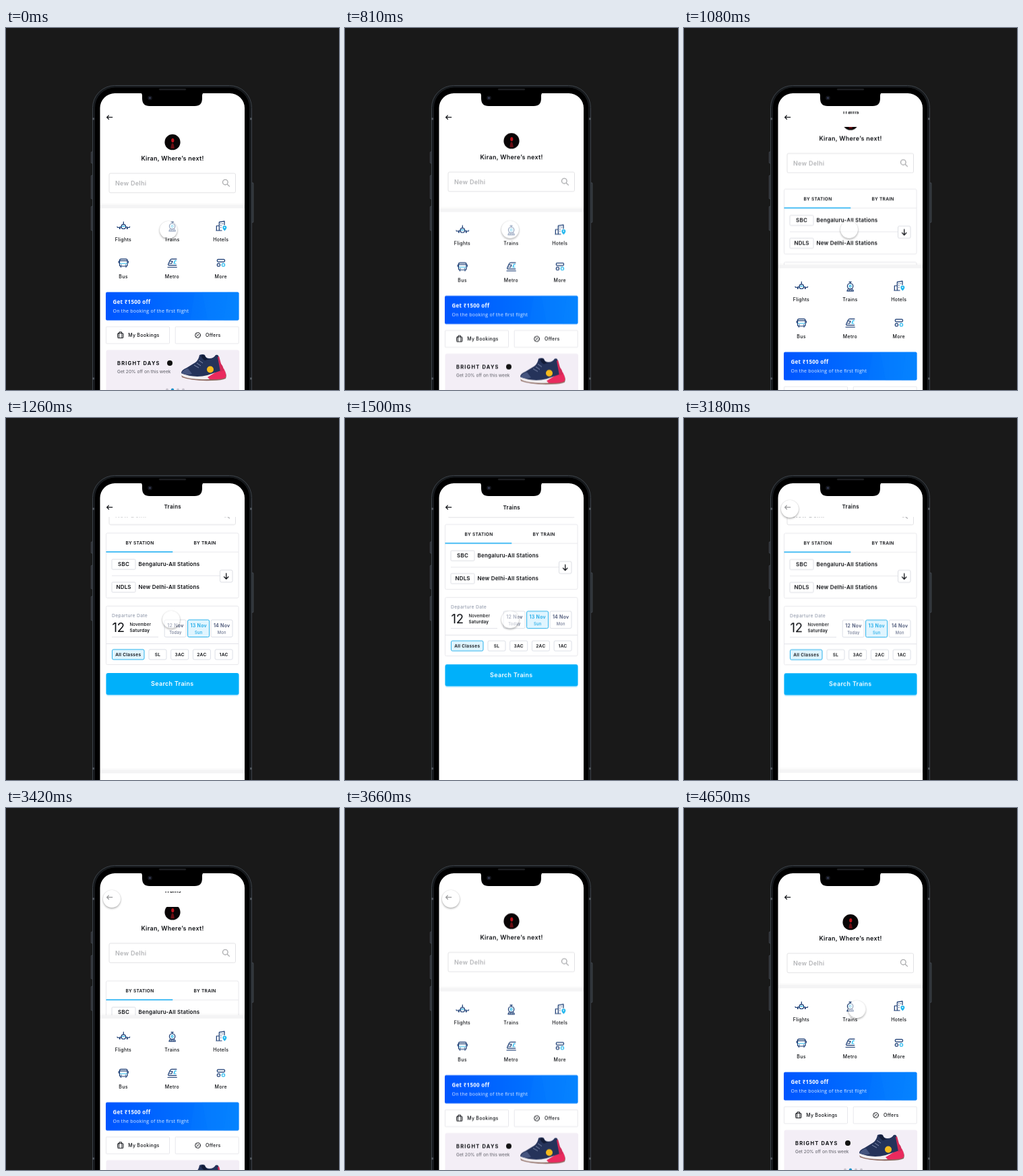
An HTML page for the animation above (4.68 s loop, 494 by 538 pixels).

```html
<!DOCTYPE html>
<html lang="en">
<head>
<meta charset="utf-8">
<title>Travel app</title>
<style>
  html, body { margin: 0; width: 100%; height: 100%; overflow: hidden; background: #191919; }
  svg { position: absolute; left: 0; top: 0; width: 494px; height: 538px; }
  text { font: 500 7px Inter, sans-serif; letter-spacing: .28px; fill: #0c0e12; }
  .mid { text-anchor: middle; }
  .bold { font-weight: 600; }
  .open { font-family: "Open Sans", "Noto Sans", sans-serif; fill: #fff; }
  .box { fill: #fff; stroke: #e8e8ec; stroke-width: 1; }
  .rule { stroke: #e9e9ed; stroke-width: 1; }
  .icon { fill: none; stroke: #12356f; stroke-width: 1.2; stroke-linecap: round; stroke-linejoin: round; }
  .icon .c { stroke: #1ab5ee; }
  .ink { fill: none; stroke: #16181d; stroke-width: 1.1; stroke-linecap: round; stroke-linejoin: round; }

  /* every layer shares one progress; only the two end offsets differ */
  .slide { animation: slide 4680ms cubic-bezier(.82, 0, .12, 1) infinite; }
  @keyframes slide {
    0%, 13.675% { transform: translateY(var(--home)); }
    35.043%, 60.47% { transform: translateY(var(--trip)); }
    81.838%, 100% { transform: translateY(var(--home)); }
  }
  .profile { --home: 0px; --trip: -98px; }
  .cards { --home: 118px; --trip: 0px; }
  .panel { --home: 0px; --trip: 295px; }
  .title { --home: -12px; --trip: 0px; }

  #tap {
    position: absolute; left: -13px; top: -13px; width: 26px; height: 26px; border-radius: 50%;
    background: rgba(255, 255, 255, .56);
    box-shadow: 0 1.5px 3px rgba(0, 0, 0, .32), 0 0 1px rgba(0, 0, 0, .25);
    animation: tap 4680ms linear infinite;
  }
  @keyframes tap {
    0%, 1.923% { transform: translate(241px, 300px); animation-timing-function: ease-out; }
    7.692%, 38.034% { transform: translate(245px, 299.5px); animation-timing-function: cubic-bezier(.7, 0, .3, .93); }
    49.359% { transform: translate(164.5px, 138px); animation-timing-function: cubic-bezier(.1, .6, .4, 1); }
    54.487%, 82.265% { transform: translate(157px, 135px); animation-timing-function: cubic-bezier(.8, 0, .95, .78); }
    92.949% { transform: translate(172px, 186px); }
    99.359% { transform: translate(257px, 299px); }
    100% { transform: translate(241px, 300px); }
  }
</style>
</head>
<body>
<svg viewBox="0 0 494 538">
  <defs>
    <clipPath id="body"><rect x="140" y="147" width="214" height="391"/></clipPath>
    <clipPath id="bar"><rect x="200" y="124.5" width="100" height="20"/></clipPath>
    <clipPath id="deal"><rect x="148" y="392.5" width="197.5" height="42" rx="2"/></clipPath>
    <linearGradient id="blue"><stop stop-color="#0055ff"/><stop offset="1" stop-color="#0080ff"/></linearGradient>
  </defs>

  <!-- phone -->
  <g fill="#2a2e34" stroke="#555b63" stroke-width=".6">
    <rect x="126.3" y="184" width="4" height="17" rx="1"/>
    <rect x="126.3" y="219" width="4" height="35" rx="1"/>
    <rect x="126.3" y="265" width="4" height="36" rx="1"/>
    <rect x="363" y="230" width="4" height="59" rx="1"/>
  </g>
  <rect x="128.5" y="85.5" width="236" height="500" rx="33" fill="#15181b" stroke="#3d434a"/>
  <rect x="131.5" y="88" width="230" height="500" rx="30.5" fill="#000" stroke="#24282d" stroke-width=".6"/>
  <path d="M128 135h3M362 135h3M128 521h3M362 521h3" stroke="#50565d" stroke-width="3"/>

  <rect x="139.5" y="97" width="214.5" height="470" rx="22" fill="#fff"/>
  <g clip-path="url(#body)">
    <g class="slide profile">
      <circle cx="247" cy="169.7" r="11.6" fill="#090506"/>
      <g fill="#c4141d">
        <ellipse cx="247.3" cy="167" rx="2.1" ry="3"/>
        <path d="M244.5 179q.5-8 2.5-8t2.800 8z" opacity=".5"/>
      </g>
      <text class="mid bold" x="247" y="196.8" style="font-size:9px">Kiran, Where’s next!</text>
      <rect class="box" x="153" y="216" width="187.5" height="28.800" rx="2" style="stroke:#e2e2e4"/>
      <text class="bold" x="162" y="233.6" style="font-size:9px;fill:#b4b5b8">New Delhi</text>
      <g fill="none" stroke="#a8a9ac" stroke-width="1.3"><circle cx="325.3" cy="229.2" r="3.8"/><path d="M328.2 232.2l3.6 3.4"/></g>
    </g>

    <g class="slide cards">
      <rect class="box" x="148.5" y="157" width="196.5" height="96.5" rx="2"/>
      <path class="rule" d="M149 185.2h196M157 220.5h160"/>
      <path d="M148.5 185h98.8" stroke="#14aef5" stroke-width="1.6"/>
      <text class="mid bold" x="198.5" y="174.4" style="font-size:6.6px">BY STATION</text>
      <text class="mid bold" x="295" y="173.8" style="font-size:6.6px">BY TRAIN</text>
      <g class="box" style="stroke:#dcdee4">
        <rect x="157" y="196" width="35" height="15" rx="1.5"/>
        <rect x="157" y="230" width="35" height="15" rx="1.5"/>
        <rect x="317.5" y="212" width="18.5" height="18" rx="2"/>
      </g>
      <path class="ink" d="M326.7 217v8M323.5 222l3.2 3.2 3.2-3.2" style="stroke-width:1.3"/>
      <g style="--stop:8px">
        <text class="mid bold stop" x="174.6" y="206.4">SBC</text>
        <text class="bold stop" x="196.5" y="206.4">Bengaluru-All Stations</text>
        <text class="mid bold stop" x="174.6" y="240.4">NDLS</text>
        <text class="bold stop" x="196.5" y="240.4">New Delhi-All Stations</text>
      </g>

      <rect class="box" x="148.5" y="265.5" width="196.5" height="87" rx="2"/>
      <text x="157" y="282" style="font-weight:400;font-size:6.8px;fill:#8790a3">Departure Date</text>
      <text x="157.5" y="304" style="font-weight:400;font-size:18.5px;letter-spacing:-.3px">12</text>
      <text x="183.4" y="295.3" style="font-size:6.2px;letter-spacing:.1px">November</text>
      <text class="bold" x="183.4" y="303.8" style="font-size:6.4px">Saturday</text>
      <path class="rule" d="M157 311.5h69M149 321.5h196" style="stroke:#e2e3e9"/>
      <g id="days"></g>
      <g id="classes"></g>

      <rect x="148.5" y="366.5" width="197" height="33" rx="3" fill="#00b0fa" opacity=".16"/>
      <rect x="148.5" y="365" width="197" height="32.5" rx="3" fill="#00b0fa"/>
      <text class="mid bold" x="246.8" y="384.4" style="font-size:9px;fill:#fff">Search Trains</text>
    </g>

    <g class="slide panel">
      <rect x="139" y="260.5" width="216" height="3" fill="#000" opacity=".02"/>
      <rect x="139" y="263" width="216" height="330" fill="#fff"/>
      <rect x="139" y="263" width="216" height="5" fill="#f4f4f5"/>

      <g class="icon">
        <!-- plane -->
        <path d="M174.3 288v3.6M165 295.3q0 1.300 1.500 1.200l4.500-.8M177.600 295.700l4.500.8q1.500.1 1.500-1.200"/>
        <circle cx="174.3" cy="295.2" r="3.3"/>
        <path class="c" d="M172.500 294.600h3.600"/>
        <path d="M168.800 297v1.200M179.800 297v1.200" stroke-width="1.8"/>
        <!-- locomotive -->
        <path d="M245 288.300h3.200M246.600 288.300v2M243.800 298.500l-2 3.300h9.600l-2-3.300M244.800 301.600l.8-2.400M248.400 301.600l-.8-2.400"/>
        <circle cx="246.600" cy="294.700" r="4.200"/>
        <circle class="c" cx="246.600" cy="294.700" r="1.500"/>
        <!-- hotel -->
        <path d="M312.300 300.800v-6.800h4v6.800M316.300 294v-5.600l7.700-1.200v5.300M311.800 301h8.200M318.700 290.800h.2M321.400 290.800h.2M318.700 293.700h.2M318.700 296.600h.2"/>
        <path d="M324.300 301.600q-3-3-3-4.900a3 3 0 0 1 6 0q0 1.900-3 4.900z" fill="#1ab5ee" stroke="none"/>
        <circle cx="324.300" cy="296.600" r="1" fill="#fff" stroke="none"/>
        <!-- bus -->
        <rect x="168.500" y="343.300" width="11.500" height="10.700" rx="2"/>
        <path d="M168.500 345.800h11.500M167.200 346.500v2.500M181.300 346.500v2.500M170.500 354.300v1.200M178 354.300v1.200M171 352.200h.2M177.300 352.200h.2"/>
        <path class="c" d="M169.500 350h9.500"/>
        <!-- metro -->
        <path d="M253 343.300h-7q-1.800 0-2.500 1.700l-2.800 6q-.4 1.700 1 1.700h11M240 355.500h13.300M244 346.500h3l-1.300 3.500h-3"/>
        <path class="c" d="M252.500 345.800h-2l-1.500 4.200h3"/>
        <!-- more -->
        <rect x="313.300" y="343.800" width="11.200" height="3.800" rx="1.500"/>
        <rect x="313.300" y="350.200" width="4.200" height="4" rx="1.500"/>
        <rect class="c" x="320.300" y="350.200" width="4.200" height="4" rx="1.500"/>
      </g>
      <g id="menu"></g>

      <g clip-path="url(#deal)">
        <rect x="148" y="392" width="198" height="43" fill="url(#blue)"/>
        <g fill="#1088ff">
          <path d="M273 435l7-43h66v43z" opacity=".12"/>
          <path d="M299 435l-8-43h55v43z" opacity=".18"/>
          <path d="M323 435l6-43h17v43z" opacity=".14"/>
        </g>
      </g>
      <text class="open" x="158.5" y="410.3" style="font-size:8px;font-weight:700">Get ₹1500 off</text>
      <text class="open" x="158.5" y="423" style="font-weight:400;letter-spacing:.25px;opacity:.9">On the booking of the first flight</text>

      <rect class="box" x="148.5" y="444" width="94" height="25" rx="1"/>
      <rect class="box" x="251.2" y="444" width="94" height="25" rx="1"/>
      <g class="ink" style="stroke-width:1">
        <rect x="165.5" y="453.7" width="8.5" height="7" rx="1"/>
        <path d="M168 453.5v-1.700h3.500v1.700M167.500 454v6.500M172 454v6.500"/>
        <circle cx="284.5" cy="456.6" r="3.9"/>
        <path d="M286 455l-3 3.200M283 455.200h.1M286 458.100h.1"/>
      </g>
      <text x="181.2" y="459">My Bookings</text>
      <text x="296" y="459">Offers</text>

      <rect x="148.5" y="478.5" width="197.5" height="90" rx="3" fill="#f3eef6"/>
      <text x="165" y="501" style="font-size:7.5px;font-weight:700;letter-spacing:1.2px">BRIGHT DAYS</text>
      <circle cx="243" cy="498" r="4" fill="#111"/>
      <text x="165" y="512.7" style="font-size:6.6px;font-weight:400;letter-spacing:.02px;fill:#5d5d66">Get 20% off on this week</text>
      <!-- shoe -->
      <path d="M260 515q10 5 27 5l20-2 18-8q3 6 1 11-6 3-20 3-30 1-45-5z" fill="#8d6a60"/>
      <path d="M260 513q10 5 27 4l37-9q3 6 1 11-18 4-38 3-22-1-27-6z" fill="#f1eef0"/>
      <path d="M299 519l13-8 11-5q4 7 3 13-6 4-24 3z" fill="#ea2a5e"/>
      <path d="M260 513q0-5 8-8l13-8q5-4 6-11 5-2 8 0 1 5 7 5 6 0 9-5 3-1 4 1l3 11q4 6 4 10l-23 8q-20 5-39-3z" fill="#25335a"/>
      <path d="M314 489l2-1 3 11q4 5 4 10l-5 2z" fill="#d32a58"/>
      <path d="M289 487q4-2 6 0 1 5 7 5l-7 2q-4-2-6-7z" fill="#131c38"/>
      <path d="M279 501l7 4M283 498l6 4M286 494l6 4" stroke="#8d97b8" stroke-width=".9"/>
      <path d="M260 513q4-6 10-7l6 8q-8 3-16-1z" fill="#46557f"/>
      <circle cx="303" cy="507.500" r="5" fill="#f7bb1c"/>
      <g fill="#c8c4ce">
        <circle cx="239" cy="537.5" r="1.9"/><circle cx="255" cy="537.5" r="1.9"/><circle cx="263" cy="537.5" r="1.9"/>
        <circle cx="247" cy="537.5" r="2.1" fill="#168fc8"/>
      </g>
    </g>
  </g>

  <path class="ink" d="M157.700 132.700h-8M152.500 129.900l-2.900 2.800 2.900 2.800" style="stroke-width:1.2"/>
  <g clip-path="url(#bar)">
    <text class="slide title mid bold" x="247.2" y="135.5" style="font-size:8px">Trains</text>
  </g>

  <!-- notch -->
  <path d="M198 95.500q4 1 4 5v4q0 11.500 11 11.500h67q11 0 11-11.500v-4q0-4 4-5z" fill="#000"/>
  <rect x="227" y="90" width="40" height="2.5" rx="1.2" fill="#1c1d20"/>
  <circle cx="213.5" cy="104" r="3.300" fill="#14161d"/>
  <circle cx="213.5" cy="104" r="1.300" fill="#3c4460"/>
</svg>
<div id="tap"></div>

<script>
  const add = (id, html) => document.getElementById(id).innerHTML += html;
  const label = (x, y, text, size, fill = "#0c0e12", weight = 600) =>
    `<text class="mid" x="${x}" y="${y}" style="font-size:${size}px;font-weight:${weight};fill:${fill}">${text}</text>`;
  const chip = (x, y, w, h, on) =>
    `<rect x="${x}" y="${y}" width="${w}" height="${h}" rx="2" fill="${on ? "#e0f5ff" : "#fff"}" stroke="${on ? "#2bb2ec" : "#dcdfe7"}"/>`;

  document.querySelectorAll(".stop").forEach(t => t.style.cssText = "font-size:8px;letter-spacing:.2px");

  ["Flights", "Trains", "Hotels", "Bus", "Metro", "More"].forEach((name, i) =>
    add("menu", label(174 + 72.4 * (i % 3), i < 3 ? 317 : 372, name, 7, "#0c0e12", 500)));

  [["12 Nov", "Today"], ["13 Nov", "Sun"], ["14 Nov", "Mon"]].forEach(([date, day], i) => {
    const x = 235.2 + 34.4 * i, on = i === 1;
    add("days", chip(x, 286, 32, 25.5, on) +
      label(x + 16.2, 297.3, date, 7, on ? "#18a9e8" : "#414d70") +
      label(x + 16.2, 306.5, day, 5.8, on ? "#18a9e8" : "#6c7691", 500));
  });

  [["All Classes", 157.5, 47.5], ["SL", 212, 26], ["3AC", 244.7, 26], ["2AC", 277.4, 26], ["1AC", 310.1, 26]]
    .forEach(([name, x, w], i) =>
      add("classes", chip(x, 330, w, 15, i === 0) + label(x + w / 2, 340, name, 6.6)));
</script>
</body>
</html>
```
